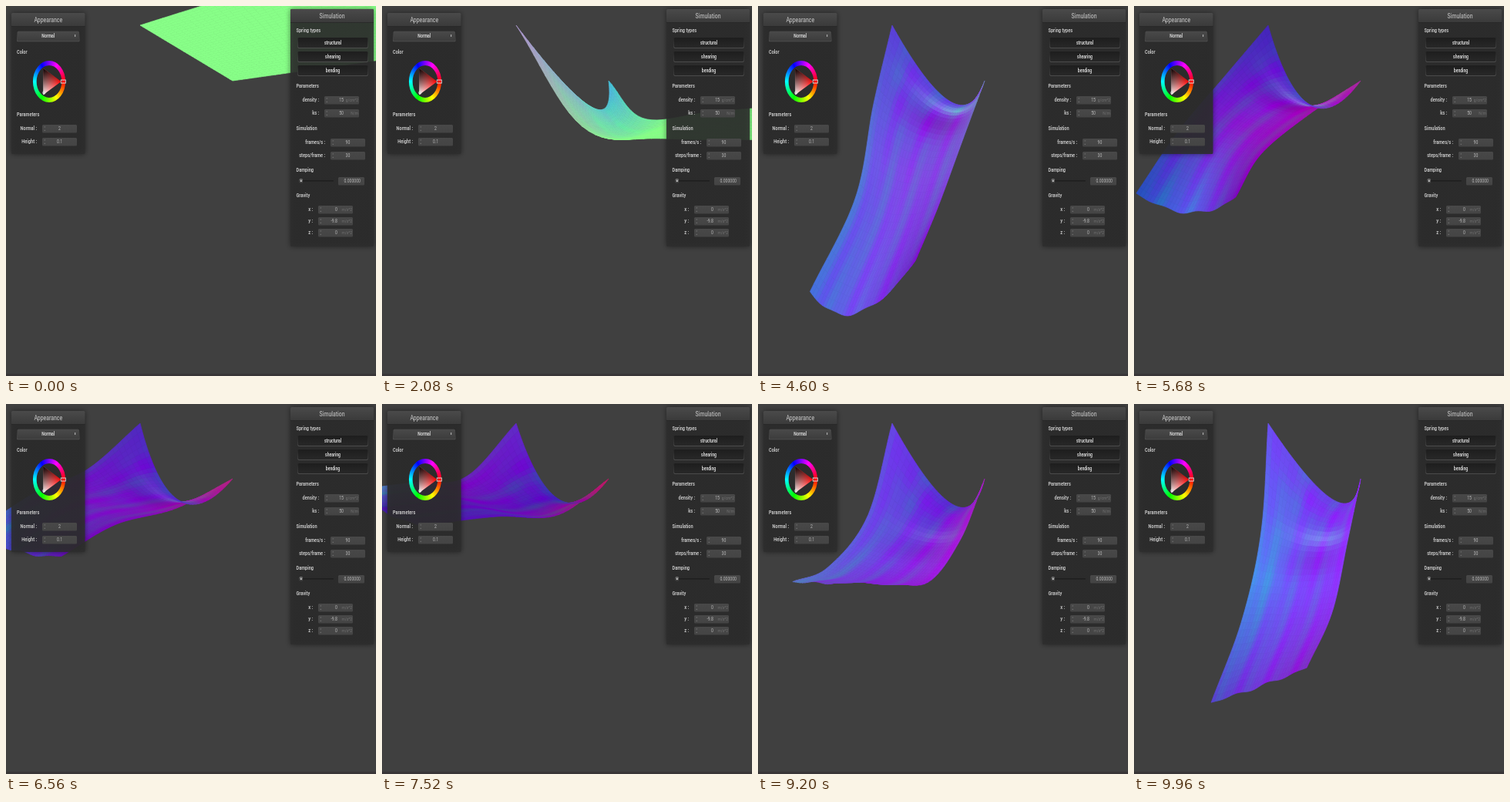
These frames come from a looping animation (480x480 px, 10000 ms). An HTML page with a canvas:

```html
<!DOCTYPE html>
<html>
<head>
<meta charset="utf-8">
<style>
html, body { margin: 0; width: 100%; height: 100%; overflow: hidden; background: #404040; }
canvas { display: block; }
</style>
</head>
<body>
<canvas id="stage" width="480" height="480"></canvas>
<script>
const ctx = document.getElementById('stage').getContext('2d');
const LOOP = 10000, SQUEEZE = 0.78, COLS = 34, ROWS = 34;
const PIN_A = [174, 25], PIN_B = [294, 97];

// Key poses of the cloth. Each shape: three points down the near edge,
// three down the far edge, middle of the pinned edge, middle of the free edge.
const times = [0, 2080, 2600, 3120, 3600, 5680, 7520, 8360, 9960];
const shapes = [
  [260, -2, 380, -39, 560, -95, 365, 87, 450, 75, 570, 58, 234, 61, 565, -18],
  [262, 158, 370, 172, 560, 173, 340, 146, 430, 137, 570, 126, 270, 130, 565, 150],
  [258, 180, 350, 240, 490, 275, 335, 155, 410, 180, 490, 200, 274, 129, 500, 240],
  [225, 175, 290, 310, 352, 410, 325, 180, 365, 245, 408, 308, 271, 125, 385, 365],
  [197, 165, 228, 310, 220, 434, 309, 190, 321, 280, 321, 350, 268, 122, 262, 430],
  [117, 92, 58, 162, 3, 243, 228, 140, 165, 192, 132, 248, 228, 128, 72, 268],
  [108, 95, 40, 102, -40, 112, 228, 144, 148, 146, 50, 158, 230, 124, -10, 134],
  [122, 122, 55, 150, -4, 132, 245, 166, 180, 190, 100, 158, 242, 130, 40, 148],
  [165, 165, 140, 280, 100, 387, 277, 178, 257, 270, 224, 342, 258, 124, 163, 366]
];
// Colours on a 3 x 3 grid: near edge, middle, far edge, each from pins to hem.
const tints = [
  '8f8 8f8 8f8 8f8 8f8 8f8 8f8 8f8 8f8',
  'a9c 8f8 8f8 6cc 8f8 8f8 4bd 8f8 8f8',
  '78e 7ae 8d9 4bd 7bd 8d9 4bd 6bd 8d9',
  '67f 69f 79e 65e 78f 78e 4be 69f 68e',
  '66e 69f 68f 64e 77f 84e 4be 68f 72d',
  '42b 62c 25b 63d 82c 56e b1a 91b 71b',
  '62c 71b 3bb 42b 61b 42a c16 52b 42a',
  '63d 72c 5bb 41b 72c 81b c18 a1b 81b',
  '65e 49e 54c 73e 75f 73d 83e 84f 82c'
].map(row => row.split(' ').map(hex => [...hex].map(d => parseInt(d, 16) * 17)));
const glows = [0, 0, 0, .3, .8, .7, 0, 0, .5];

const lerp = (a, b, s) => a + (b - a) * s;
const mix = (a, b, s) => a.map((x, i) => lerp(x, b[i], s));
const clamp = x => Math.max(0, Math.min(1, x));
const bump = (x, width) => Math.exp(-x * x / (width * width));

function hermite(a, b, ma, mb, s) {
  const r = 1 - s;
  return a * r * r * (1 + 2 * s) + b * s * s * (3 - 2 * s) + ma * s * r * r - mb * s * s * r;
}

const slope = (k, i) => (shapes[k + 1][i] - shapes[k][i]) / (times[k + 1] - times[k]);
function velocity(k, i) {
  if (k === 0) return 0;
  if (k === times.length - 1) return 2 * slope(k - 1, i) - velocity(k - 1, i);
  const before = times[k] - times[k - 1], after = times[k + 1] - times[k];
  return (slope(k - 1, i) * after + slope(k, i) * before) / (before + after);
}

function poseAt(t) {
  let k = 0;
  while (k < times.length - 2 && t >= times[k + 1]) k++;
  const span = times[k + 1] - times[k], s = (t - times[k]) / span;
  const n = shapes[k].map((x, i) =>
    hermite(x, shapes[k + 1][i], velocity(k, i) * span, velocity(k + 1, i) * span, s));
  const q = Math.min(1, s);
  return {
    near: [PIN_A, [n[0], n[1]], [n[2], n[3]], [n[4], n[5]]],
    far: [PIN_B, [n[6], n[7]], [n[8], n[9]], [n[10], n[11]]],
    top: [n[12], n[13]],
    hem: [n[14], n[15]],
    tint: tints[k].map((c, i) => mix(c, tints[k + 1][i], q)),
    glow: lerp(glows[k], glows[k + 1], q)
  };
}

function along(p, v, axis) {
  const i = Math.min(2, Math.floor(v * 3));
  const tangent = j => j === 0 ? p[1][axis] - p[0][axis]
    : j === 3 ? p[3][axis] - p[2][axis]
    : (p[j + 1][axis] - p[j - 1][axis]) / 2;
  return hermite(p[i][axis], p[i + 1][axis], tangent(i), tangent(i + 1), v * 3 - i);
}

function clothPoint(pose, u, v, fold) {
  const { near, far, top, hem } = pose;
  return [0, 1].map(axis => {
    const sag = top[axis] - (near[0][axis] + far[0][axis]) / 2;
    const droop = hem[axis] - (near[3][axis] + far[3][axis]) / 2;
    const ripple = axis * fold * 2 * v * v * Math.sin(u * 19) * u * (1 - u) * 4;
    return lerp(along(near, v, axis), along(far, v, axis), u)
      + 4 * u * (1 - u) * (sag * (1 - v) ** 3.5 + droop * v * v) + ripple;
  });
}

function clothColor(pose, u, v, fold, t) {
  const i = Math.min(1, Math.floor(u * 2)), j = Math.min(1, Math.floor(v * 2));
  const at = (a, b) => pose.tint[a * 3 + b];
  const base = mix(mix(at(i, j), at(i, j + 1), v * 2 - j),
    mix(at(i + 1, j), at(i + 1, j + 1), v * 2 - j), u * 2 - i);
  const wave = fold * (Math.sin(u * 21 + v * 3 + t * .0006) + .7 * Math.sin(u * 43 - v * 4));
  const swag = fold * Math.sin(v * 34 - u * 5) * 4 * u * (1 - u) * (1 - v) ** 3;
  const bandAt = (t < 8360 ? .1 : .28) + .1 * (u - .6) ** 2;
  const across = pose.glow * bump(u - .62, .3);
  const light = across * bump(v - bandAt, .045), shade = across * bump(v - bandAt - .13, .08);
  return `rgb(${[
    base[0] + 8 * wave + 14 * swag + 10 * light + 18 * shade,
    base[1] - 12 * wave - 16 * swag + 120 * light - 55 * shade,
    base[2] + 6 * wave + 8 * swag - 28 * shade
  ].map(Math.round)})`;
}

function drawCloth(t) {
  const pose = poseAt(t), fold = clamp((t - 1400) / 2000);
  const grid = [];
  for (let i = 0; i <= COLS; i++) {
    grid.push([]);
    for (let j = 0; j <= ROWS; j++) grid[i].push(clothPoint(pose, i / COLS, j / ROWS, fold));
  }
  ctx.lineWidth = .7;
  for (let i = COLS - 1; i >= 0; i--) {
    for (let j = 0; j < ROWS; j++) {
      ctx.beginPath();
      for (const p of [grid[i][j], grid[i + 1][j], grid[i + 1][j + 1], grid[i][j + 1]]) ctx.lineTo(...p);
      ctx.closePath();
      ctx.fillStyle = ctx.strokeStyle = clothColor(pose, (i + .5) / COLS, (j + .5) / ROWS, fold, t);
      ctx.fill();
      ctx.stroke();
    }
  }
}

function text(str, x, y, { size = 7.2, align = 'left', color = '#c4c4c4', weight = 700 } = {}) {
  ctx.save();
  ctx.translate(x, y);
  ctx.scale(SQUEEZE, 1);
  ctx.font = `${weight} ${size}px Roboto, sans-serif`;
  ctx.textAlign = align;
  ctx.textBaseline = 'middle';
  ctx.fillStyle = color;
  ctx.fillText(str, 0, 0);
  ctx.restore();
}

function box(x, y, w, h, top, bottom = top) {
  const fill = ctx.createLinearGradient(0, y, 0, y + h);
  fill.addColorStop(0, top);
  fill.addColorStop(1, bottom);
  ctx.fillStyle = fill;
  ctx.beginPath();
  ctx.roundRect(x, y, w, h, 1.5);
  ctx.fill();
}

function panel(title, x, y, w, h) {
  ctx.save();
  ctx.shadowColor = 'rgba(0,0,0,.55)';
  ctx.shadowBlur = 7;
  box(x, y, w, h, 'rgba(45,45,45,.88)');
  ctx.restore();
  box(x, y, w, 17.5, '#4a4a4a', '#3a3a3a');
  ctx.fillStyle = '#252525';
  ctx.fillRect(x, y + 17, w, .7);
  text(title, x + w / 2, y + 9, { size: 8.8, align: 'center', color: '#b4b4b4', weight: 500 });
}

function button(label, x, y, w, h, top, bottom) {
  box(x - .5, y - .5, w + 1, h + 1.2, '#1d1d1d', '#555');
  box(x, y, w, h, top, bottom);
  text(label, x + w / 2, y + h / 2 + .3, { size: 6.5, align: 'center', color: '#d6d6d6' });
}

function field(label, x, y, value, unit) {
  text(label + ' :', x - 7, y, { align: 'right' });
  box(x, y - 5, 45, 10.5, '#484848', '#444');
  ctx.fillStyle = '#6c6c6c';
  ctx.fillRect(x + 2.5, y - 2.7, 1.6, 1.2);
  ctx.fillRect(x + 2.5, y + 1.8, 1.6, 1.2);
  const style = { size: 6.6, color: '#b8b8b8', weight: 400 };
  if (unit) {
    text(value, x + 25, y + .3, { ...style, align: 'right' });
    text(unit, x + 44, y + .3, { ...style, align: 'right', color: '#707070', size: 6.2 });
  } else {
    text(value, x + 22.5, y + .3, { ...style, align: 'center' });
  }
}

function colorWheel(x, y) {
  ctx.save();
  ctx.translate(x, y);
  ctx.scale(SQUEEZE, 1);
  const hue = ctx.createConicGradient(0, 0, 0);
  for (let i = 0; i <= 6; i++) hue.addColorStop(i / 6, `hsl(${i * 60} 100% 50%)`);
  ctx.strokeStyle = hue;
  ctx.lineWidth = 6;
  ctx.beginPath();
  ctx.arc(0, 0, 24, 0, 7);
  ctx.stroke();

  const r = 20, dx = -r / 2, dy = r * .866;
  const white = ctx.createLinearGradient(r, 0, dx, dy);
  white.addColorStop(0, '#f00');
  white.addColorStop(1, '#fff');
  const black = ctx.createLinearGradient((r + dx) / 2, dy / 2, dx, -dy);
  black.addColorStop(0, 'rgba(0,0,0,0)');
  black.addColorStop(1, '#000');
  ctx.beginPath();
  ctx.moveTo(r, 0);
  ctx.lineTo(dx, dy);
  ctx.lineTo(dx, -dy);
  ctx.closePath();
  for (const paint of [white, black]) {
    ctx.fillStyle = paint;
    ctx.fill();
  }
  ctx.lineWidth = 1;
  ctx.strokeStyle = '#ddd';
  ctx.strokeRect(19.5, -2, 8, 4);
  ctx.beginPath();
  ctx.arc(-8.5, 14.5, 2, 0, 7);
  ctx.stroke();
  ctx.restore();
}

function drawPanels() {
  panel('Appearance', 7, 9, 95.5, 183);
  button('Normal', 14.5, 32.5, 80.5, 13, '#4a4a4a', '#3c3c3c');
  ctx.fillStyle = '#aaa';
  ctx.fillRect(89, 37, 1.2, 3);
  text('Color', 14, 59.5);
  colorWheel(56, 98);
  text('Parameters', 14, 141);
  field('Normal', 47, 159, '2');
  field('Height', 47, 176, '0.1');

  panel('Simulation', 369, 4, 108, 308);
  text('Spring types', 376.5, 32);
  ['structural', 'shearing', 'bending'].forEach((name, i) =>
    button(name, 379, 41.5 + i * 18, 90, 12.5, '#1e1e1e', '#282828'));
  text('Parameters', 376.5, 104);
  field('density', 413, 122, '15', 'g/cm^2');
  field('ks', 413, 139, '50', 'N/m');
  text('Simulation', 376.5, 158.5);
  field('frames/s', 421, 177, '90');
  field('steps/frame', 421, 194, '30');
  text('Damping', 376.5, 213);
  box(381, 226, 44, 2, '#1c1c1c', '#262626');
  box(380.5, 224, 4.5, 6, '#777', '#333');
  ctx.fillStyle = '#ccc';
  ctx.fillRect(382, 226, 1.6, 2);
  box(431, 222, 34, 10.5, '#484848', '#444');
  text('0.000000', 460, 227.5, { size: 6.6, align: 'right', color: '#b8b8b8', weight: 400 });
  text('Gravity', 376.5, 246);
  field('x', 405, 264, '0', 'm/s^2');
  field('y', 405, 279, '-9.8', 'm/s^2');
  field('z', 405, 294, '0', 'm/s^2');
}

function frame() {
  ctx.fillStyle = '#404040';
  ctx.fillRect(0, 0, 480, 480);
  drawCloth(performance.now() % LOOP);
  ctx.fillStyle = '#393638';
  ctx.fillRect(0, 477, 480, 3);
  drawPanels();
  requestAnimationFrame(frame);
}
frame();
</script>
</body>
</html>
```
